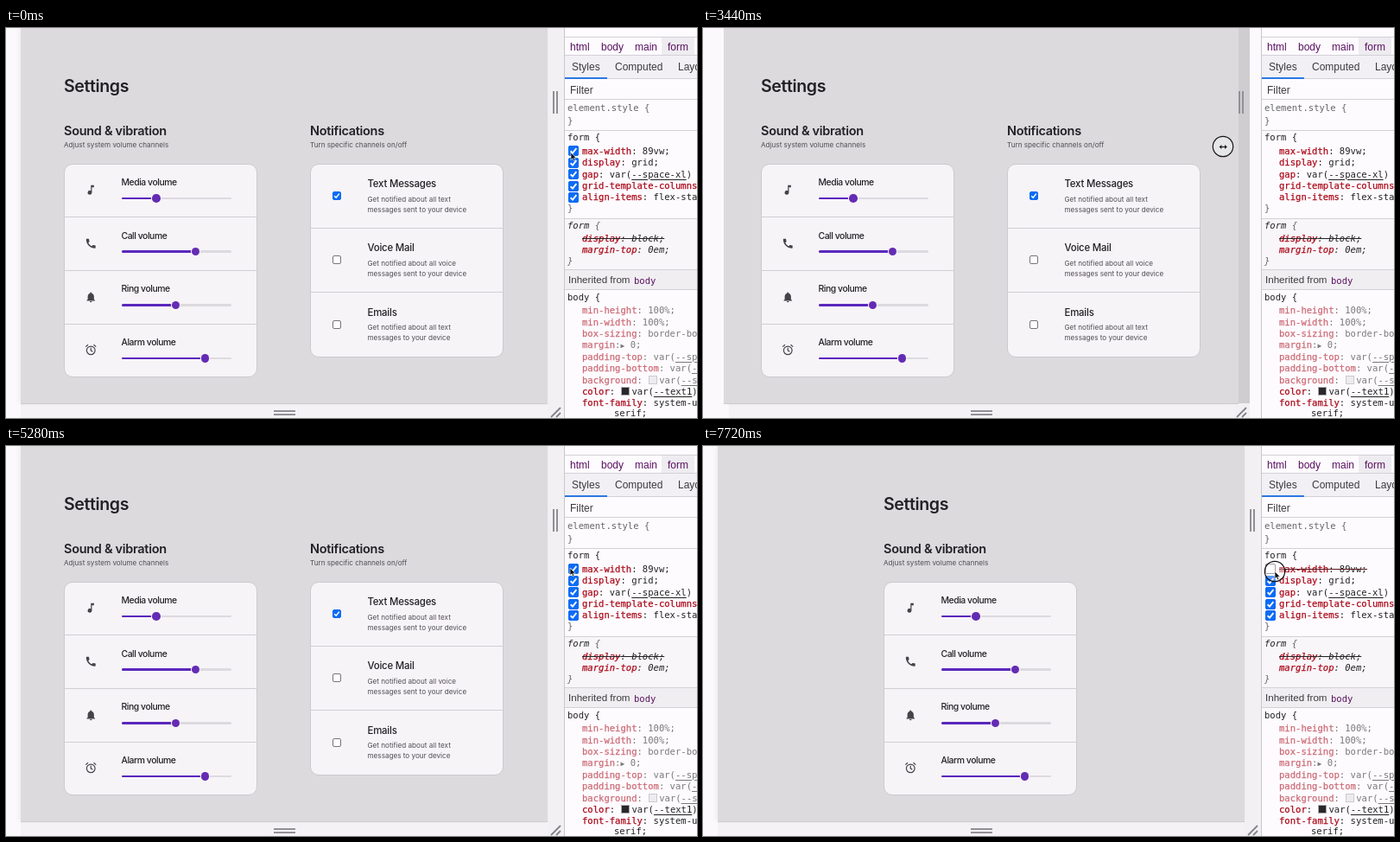
An HTML page that plays this animation: 800 by 451 pixels, repeating every 7760 ms.

```html
<!DOCTYPE html>
<html lang="en">
<head>
<meta charset="utf-8">
<title>Settings layout</title>
<style>
@property --one { syntax: "<number>"; inherits: true; initial-value: 0; }
@property --up { syntax: "<number>"; inherits: true; initial-value: 0; }
@property --off { syntax: "<number>"; inherits: true; initial-value: 0; }
@property --pane { syntax: "<number>"; inherits: true; initial-value: 0; }
@property --press { syntax: "<number>"; inherits: true; initial-value: 0; }
@property --hot { syntax: "<number>"; inherits: true; initial-value: 0; }
@property --h { syntax: "<number>"; inherits: true; initial-value: 0; }

html, body { margin: 0; width: 100%; height: 100%; overflow: hidden; background: #fbf9fc; }
.stage {
  position: relative; width: 800px; height: 451px; overflow: hidden;
  font-family: Inter, sans-serif; color: #222024;
  animation-name: columns, padding, rule, pane, press, hot, drag;
  animation-duration: 7760ms;
  animation-iteration-count: infinite;
  animation-timing-function: step-end, step-end, step-end, step-end, step-end, step-end, linear;
}
.stage * { position: absolute; box-sizing: border-box; }
.stage span, .stage u, .stage s, .stage i, .stage b { position: static; }
.t { line-height: 20px; margin: -10px 0 0; white-space: pre; }

/* one column or two */
@keyframes columns {
  0% { --one: 0 } 7.73% { --one: 1 } 25.77% { --one: 0 } 44.85% { --one: 1 }
  58.76% { --one: 0 } 74.23%, 100% { --one: 1 }
}
/* smaller padding on narrow pages */
@keyframes padding {
  0% { --up: 0 } 46.4% { --up: 1 } 56.2% { --up: 0 } 84.5% { --up: 1 } 91.2%, 100% { --up: 0 }
}
/* max-width switched off */
@keyframes rule {
  0% { --off: 0 } 7.73% { --off: 1 } 25.77% { --off: 0 } 74.23%, 100% { --off: 1 }
}
/* pointer inside the rules pane */
@keyframes pane {
  0% { --pane: 1 } 35.2% { --pane: 0 } 65.5% { --pane: 1 } 76.2% { --pane: 0 } 95.26%, 100% { --pane: 1 }
}
@keyframes press {
  0% { --press: 0 } 7.2% { --press: 1 } 8.5% { --press: 0 } 25.2% { --press: 1 }
  26.6% { --press: 0 } 42.8% { --press: 1 } 59.9% { --press: 0 } 73.8% { --press: 1 }
  74.8% { --press: 0 } 82.4% { --press: 1 } 92.9% { --press: 0 } 98.6%, 100% { --press: 1 }
}
/* resize strip hovered */
@keyframes hot {
  0% { --hot: 0 } 35.2% { --hot: 1 } 45.4% { --hot: 0 } 59.4% { --hot: 1 } 65.5% { --hot: 0 }
  76.2% { --hot: 1 } 84.5% { --hot: 0 } 92.8% { --hot: 1 } 95.26%, 100% { --hot: 0 }
}
/* inset of the page on each side */
@keyframes drag {
  0%, 43.3% { --h: 0 } 44.33% { --h: 13 } 46.9% { --h: 70 } 51% { --h: 118 } 53.6% { --h: 100 }
  57.22% { --h: 21 } 57.73% { --h: 20 } 59.8%, 83% { --h: 0 } 85.57% { --h: 90 } 87.1% { --h: 128 }
  88.66% { --h: 115 } 89.18% { --h: 108 } 91.75% { --h: 20 } 92.5%, 100% { --h: 0 }
}
@keyframes pointer {
  0% { left: 654px; top: 144px } 7.7%, 31.4% { left: 657px; top: 145px }
  38.7%, 42.8% { left: 636px; top: 138px } 44.33% { left: 602px; top: 137px }
  46.9% { left: 540px; top: 135px } 50.5% { left: 515px; top: 134px } 53.1% { left: 540px; top: 133px }
  57.73% { left: 639px; top: 131.5px } 59.8%, 63.1% { left: 640px; top: 132px }
  69.6%, 74.2% { left: 657px; top: 144px } 78.3%, 82.5% { left: 634px; top: 141px }
  85% { left: 545px; top: 144px } 86.6% { left: 505px; top: 145px } 89.18% { left: 558.5px; top: 145px }
  92.3% { left: 634px; top: 145px } 93.8% { left: 636px; top: 145px } 97.4%, 100% { left: 661.5px; top: 145px }
}

/* resizable viewport */
.side { left: calc(627px - var(--h) * 1px); top: 0; width: 19px; height: 451px; background: #f2f0f3; }
.side::before { content: ""; position: absolute; inset: 0 0 17px; background: #cfcdd0; opacity: var(--hot); }
.foot { left: calc(17px + var(--h) * 1px); right: calc(173px + var(--h) * 1px); top: 434px; height: 17px; background: #f4f2f5; }
.sheet {
  left: calc(17px + var(--h) * 1px); right: calc(173px + var(--h) * 1px); top: 0; height: 434px;
  background: #fbf9fc; border: solid #dedce0; border-width: 0 1px; box-shadow: -2px 0 6px rgba(0, 0, 0, .05);
}
.page {
  left: calc(17px + var(--h) * 1px); right: calc(173px + var(--h) * 1px); top: 0; height: 435px;
  overflow: hidden; background: #dcdadd; border-bottom: 1px solid #cdcbce;
  animation: drag 7760ms linear 40ms infinite;
}
.grip-x { left: 6px; top: 73px; width: 6px; height: 26px; border: solid #929094; border-width: 0 2px; }
.grip-y { left: 310px; top: 442px; width: 25px; height: 6px; border: solid #929094; border-width: 2px 0; }
.corner { left: 3px; top: 438px; }

/* settings form */
.content {
  left: 50%; margin-left: -322px; top: 0; width: 644px; height: 451px;
  transform: translate(calc(var(--one) * 142px), calc(var(--up) * -10px));
}
.second { left: calc(285px - var(--one) * 285px); top: calc(var(--one) * 325px); }
.h1 { font-size: 19.6px; font-weight: 600; letter-spacing: -.38px; }
.h2 { font-size: 14.5px; font-weight: 600; letter-spacing: -.3px; }
.small { font-size: 8.15px; color: #504d53; }
.label { font-size: 10.4px; font-weight: 500; letter-spacing: -.45px; }
.item { font-size: 11.4px; font-weight: 500; letter-spacing: -.2px; }
.card { left: 67px; top: 156.5px; width: 224px; background: #f7f4f8; border: 1px solid #cdcacf; border-radius: 10px; }
.rule { left: 67px; width: 224px; height: 1px; background: #d2cfd4; }
.track { left: 133.5px; width: 127px; height: 2.6px; border-radius: 2px; background: #dddadf; }
.fill { left: 133.5px; height: 2.6px; border-radius: 2px; background: #5b27bd; }
.thumb { width: 9.6px; height: 9.6px; margin: -4.8px; border-radius: 50%; background: #642bb3; box-shadow: 0 0 0 1px #f7f4f8; }
.box { width: 10px; height: 10px; border: 1px solid #77747a; border-radius: 2px; background: #fff; }
.box.on { border-color: #0b6cf5; background: #0b6cf5; }
.icon { left: 90.5px; width: 14.5px; height: 14.5px; fill: #454248; }

/* developer tools */
.tools { left: 646px; top: 0; width: 154px; height: 451px; overflow: hidden; background: #fdfbfe; border-left: 1px solid #c9c7ca; }
.inner { left: -647px; top: 0; width: 900px; height: 451px; }
.bar { left: 646px; width: 200px; }
.ui { font: 12px/20px "Liberation Sans", Arial, sans-serif; color: #3c3a3e; }
.crumb { color: #5a1160; }
.code { font: 10.55px/20px "DejaVu Sans Mono", monospace; color: #222; }
.code b { font-weight: 400; color: #ab0a1a; -webkit-text-stroke: .25px; }
.code u { text-underline-offset: 1.5px; text-decoration-thickness: 1px; }
.code s { text-decoration-thickness: 1px; }
.dim { opacity: .6; }
.grey { color: #666; }
.sw { display: inline-block; width: 10px; height: 10px; margin: 0 2px 0 1px; vertical-align: -1px; border: 1px solid #aaa; }
.tick { left: 651px; width: 12px; height: 12px; margin-top: -5.5px; opacity: var(--pane); }
.tick.first { opacity: max(var(--pane), var(--off)); }
.first .on { opacity: calc(1 - var(--off)); }
.strike { left: 667px; top: 141.5px; width: 102px; height: 1px; background: #5b1a20; opacity: var(--off); }

.pointer { width: 0; height: 0; animation: pointer 7760ms linear infinite; }
.pointer svg { left: -16px; top: -16px; }
.arrow { opacity: var(--pane); }
.resize { opacity: calc(1 - var(--pane)); }
.ring { opacity: var(--press); }
</style>
</head>
<body>
<div class="stage">
  <div class="side">
    <div class="grip-x"></div>
    <svg class="corner" width="13" height="13" stroke="#85838a" stroke-width="1.8"><path d="M1 12L12 1M7 12L12 7"/></svg>
  </div>
  <div class="foot"></div>
  <div class="grip-y"></div>
  <div class="sheet"></div>
  <div class="page"><div class="content" id="content"></div></div>
  <div class="tools"><div class="inner" id="tools"></div></div>
  <div class="pointer">
    <svg width="32" height="32" fill="none">
      <circle class="ring" cx="16" cy="16" r="11.7" stroke="#151316" stroke-width="1.2" fill="#fff" fill-opacity=".3"/>
      <path class="arrow" d="M16 16v8.6l2-1.8 1.3 3 1.5-.7-1.3-2.9h2.6z" fill="#111" stroke="#fff" stroke-width=".6"/>
      <path class="resize" d="M11.5 16.5l3-2.8v2h3.5v-2l3 2.8-3 2.8v-2h-3.5v2z" fill="#111" stroke="#fff" stroke-width=".3"/>
    </svg>
  </div>
</div>
<script>
const text = (cls, x, y, html) => `<div class="t ${cls}" style="left:${x}px;top:${y}px">${html}</div>`;
const block = (cls, css, inner = "") => `<div class="${cls}" style="${css}">${inner}</div>`;
const check = size => `<svg width="${size}" height="${size}" viewBox="0 0 10 10" style="left:-1px;top:-1px"><path d="M2.2 5.2l2 2 3.6-4.6" fill="none" stroke="#fff" stroke-width="1.5"/></svg>`;

const icons = [
  `<path d="M12 3v10.6a4 4 0 1 0 2 3.4V7h4V3z"/>`,
  `<path d="M20 15.4c-1.2 0-2.4-.2-3.5-.6-.4-.1-.7 0-1 .2L13.9 17c-2.8-1.3-5.5-3.9-6.9-6.8l2-1.7c.2-.3.3-.7.2-1-.4-1.1-.6-2.3-.6-3.5 0-.5-.4-1-1-1H4.2C3.6 3 3 3.2 3 4c0 9.3 7.7 17 17 17 .7 0 1-.6 1-1.2v-3.4c0-.6-.4-1-1-1z"/>`,
  `<path d="M12 22a2 2 0 0 0 2-2h-4a2 2 0 0 0 2 2zm6-6v-5c0-3-1.6-5.6-4.5-6.3V4a1.5 1.5 0 0 0-3 0v.7C7.6 5.4 6 8 6 11v5l-2 2v1h16v-1z"/>`,
  `<path d="M12 8v5l3.5 2.2M2 6l4.6-3.9M22 6l-4.6-3.9M20 13a8 8 0 1 1-16 0a8 8 0 0 1 16 0z" fill="none" stroke="#454248" stroke-width="2"/>`
];

function volumes() {
  const rows = [["Media", 174], ["Call", 219.3], ["Ring", 196.7], ["Alarm", 230.7]];
  return rows.map(([name, x], i) => {
    const y = 61.7 * i;
    return (i ? block("rule", `top:${156.5 + y}px`) : "") +
      `<svg class="icon" viewBox="0 0 24 24" style="top:${180.3 + y}px">${icons[i]}</svg>` +
      text("label", 133.5, 179 + y, name + " volume") +
      block("track", `top:${195.7 + y}px`) +
      block("fill", `top:${195.7 + y}px;width:${x - 133.5}px`) +
      block("thumb", `left:${x}px;top:${197 + y}px`);
  }).join("");
}

function channels() {
  const rows = [
    ["Text Messages", "Get notified about all text", "messages sent to your device"],
    ["Voice Mail", "Get notified about all voice", "messages sent to your device"],
    ["Emails", "Get notified about all text", "messages to your device"]
  ];
  return rows.map(([name, a, b], i) => {
    const y = 74.3 * i;
    return (i ? block("rule", `top:${156.8 + y}px`) : "") +
      block(i ? "box" : "box on", `left:93px;top:${189 + y}px`, i ? "" : check(10)) +
      text("item", 133.5, 180 + y, name) +
      text("small", 133.5, 197.5 + y, a) +
      text("small", 133.5, 209.5 + y, b);
  }).join("");
}

const heading = (title, note) => text("h2", 67, 118.5, title) + text("small", 67, 135.3, note);

document.getElementById("content").innerHTML =
  text("h1", 67, 67, "Settings") +
  heading("Sound &amp; vibration", "Adjust system volume channels") +
  block("card", "height:247.5px") + volumes() +
  block("second", "", heading("Notifications", "Turn specific channels on/off") +
    block("card", "height:224px") + channels());

const prop = (name, value) => `<b>${name}</b>: ${value}`;
const dim = (name, value) => `<span class="dim">${prop(name, value)}</span>`;
const swatch = color => `<span class="sw" style="background:${color}"></span>`;
const code = [
  [650, 92, `<span class="grey">element.style {</span>`],
  [650, 107, `<span class="grey">}</span>`],
  [650, 126, "form {"],
  [667, 141.5, prop("max-width", "89vw;")],
  [667, 155, prop("display", "grid;")],
  [667, 168.5, prop("gap", "var(<u>--space-xl</u>)")],
  [667, 182, prop("grid-template-columns", "repeat")],
  [667, 195, prop("align-items", "flex-start;")],
  [650, 208, `<span class="grey">}</span>`],
  [650, 228, `<i>form <span class="grey">{</span></i>`],
  [667, 242.5, `<i><s>${prop("display", "block;")}</s></i>`],
  [667, 256, `<i>${prop("margin-top", "0em;")}</i>`],
  [650, 269, `<i class="grey">}</i>`],
  [727, 291.5, `<span style="color:#5a1160">body</span>`],
  [650, 311, "body {"],
  [667, 326, dim("min-height", "100%;")],
  [667, 339.5, dim("min-width", "100%;")],
  [667, 352.5, dim("box-sizing", "border-box;")],
  [667, 366, `<span class="dim"><b>margin</b>:<span style="font-size:8px">▶</span> 0;</span>`],
  [667, 379.5, dim("padding-top", "var(<u>--space-xl</u>)")],
  [667, 393, dim("padding-bottom", "var(<u>--space-xl</u>)")],
  [667, 406.5, dim("background", swatch("#e4e2e6") + "var(<u>--surface1</u>)")],
  [667, 419.5, prop("color", swatch("#29262c") + "var(<u>--text1</u>);")],
  [667, 433, prop("font-family", "system-ui,")],
  [704, 445, "serif;"]
];
const line = y => block("bar", `top:${y}px;height:1px;background:#d3d1d5`);

document.getElementById("tools").innerHTML =
  block("", "left:759px;top:11px;width:38px;height:20px;background:#eeecf0") +
  block("bar", "top:32px;height:27px;background:#f2f0f4") +
  block("bar", "top:220px;height:60px;background:#f8f6f9") +
  block("bar", "top:280px;height:22px;background:#f0eef1") +
  [10, 31, 58, 82, 118, 220, 279, 302].map(line).join("") +
  block("", "left:647px;top:57px;width:49px;height:2px;background:#2b78e4") +
  [[653, "html"], [689, "body"], [728, "main"], [766, "form"]].map(([x, s]) => text("ui crumb", x, 21.5, s)).join("") +
  [[655, "Styles"], [705, "Computed"], [778, "Layout"]].map(([x, s]) => text("ui", x, 45, s)).join("") +
  text("ui", 653, 71.5, "Filter") +
  text("ui", 651, 291, `<span style="font-size:11.6px">Inherited from</span>`) +
  code.map(row => text("code", ...row)).join("") +
  block("strike", "") +
  [141.5, 155, 168.5, 182, 195.5].map((y, i) => block(i ? "tick" : "tick first", `top:${y}px`,
    block("box", "width:12px;height:12px") +
    block("box on", "width:12px;height:12px", check(12)))).join("");
</script>
</body>
</html>
```
